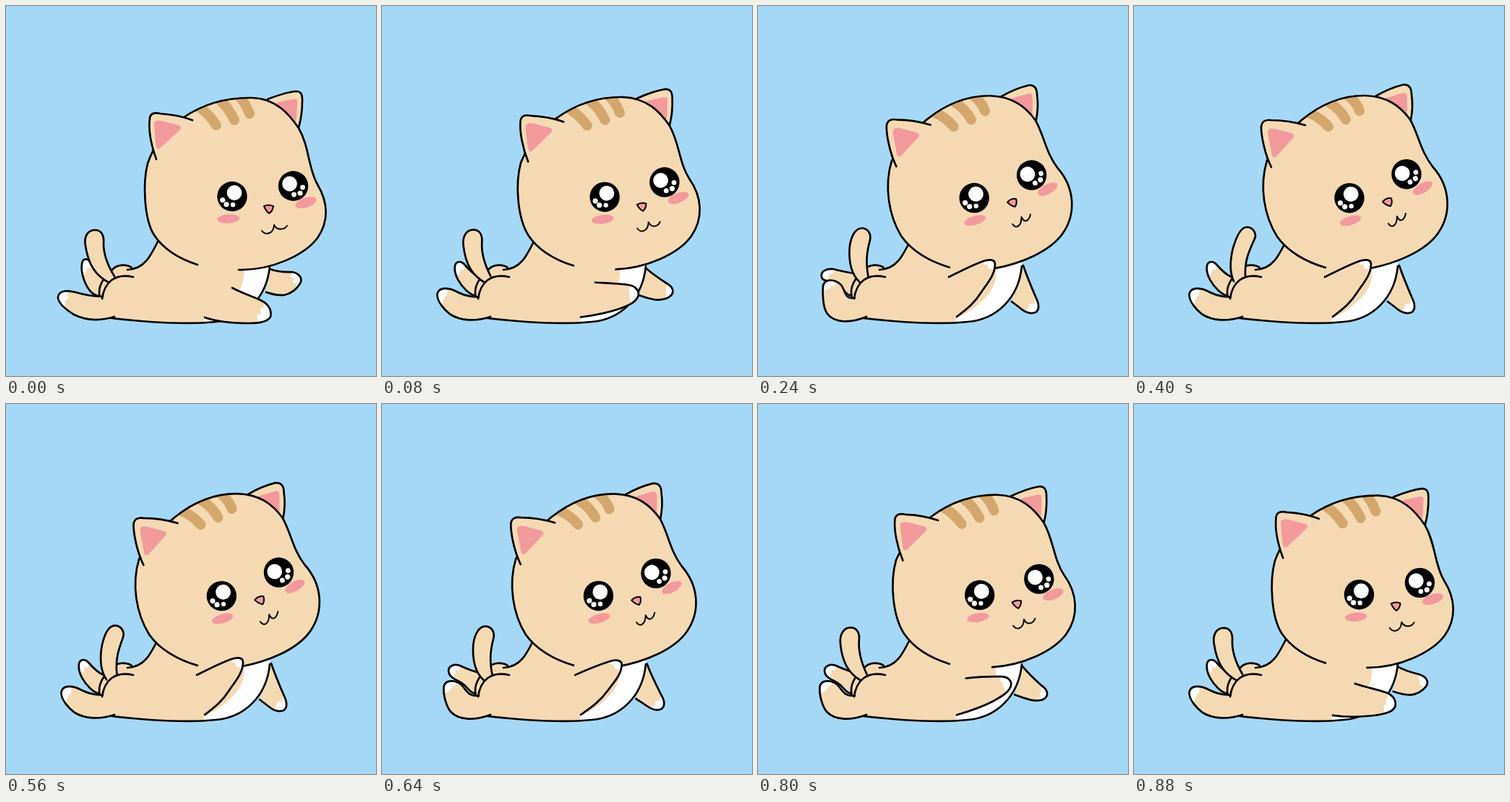
An HTML page with a canvas for the animation above (960 ms loop, 512x512 px).

```html
<!DOCTYPE html>
<html lang="en">
<head>
<meta charset="utf-8">
<title>Kitten</title>
<style>
html, body { margin: 0; width: 100%; height: 100%; overflow: hidden; background: #a5d8f7; }
canvas { display: block; width: 512px; height: 512px; }
</style>
</head>
<body>
<canvas id="stage" width="512" height="512"></canvas>
<script>
const ctx = document.getElementById('stage').getContext('2d');
const SKY = '#a5d8f7', FUR = '#f5d9b3', TAN = '#d3a66d', PINK = '#f2999c', INK = '#000', WHITE = '#fff';
const STEP = 80, COUNT = 12;

// Pose weights for each step of the loop
const headPose = [0, .32, .66, .92, 1, 1, 1, .98, .9, .74, .42, .1];
const armPose = [0, .5, 1, 2, 2, 2, 2, 2, 1.75, 1.3, .7, .2];
const tailPose = [0, .1, .33, .62, .88, 1, 1, .84, .6, .34, .15, .03];

const poses = {
  farArm: [
    'M365 364C378 369 388 368 396 368C406 370 411 377 407 384C402 392 394 398 385 400C374 401 366 398 360 396',
    'M366 362C372 374 382 388 391 399C398 406 399 413 393 417C387 420 378 416 372 413C364 409 358 407 353 405',
    'M367 359C372 374 378 388 384 402C389 412 390 420 384 424C376 427 369 423 364 419C359 415 355 412 351 409'],
  farPaw: [
    'M396 360L394 376L398 376L397 383L402 384L402 395L420 395L415 360',
    'M402 399L391 402L390 407L386 407L386 412L380 420L390 430L405 420',
    'M394 406L383 408L381 413L376 412L374 417L366 428L380 435L395 425'],
  nearArm: [
    'M313 390C328 398 342 402 354 408C364 413 368 422 366 430C362 438 348 439 335 439C310 439 290 436 275 431',
    'M277 375C295 369 315 366 328 364C338 362 345 366 343 373C341 383 330 391 322 399C308 412 292 421 275 430',
    'M264 375C280 367 296 359 309 354C318 350 328 350 328 357C328 372 317 384 309 396C299 412 288 420 275 430'],
  nearPaw: [
    'M358 405L356 419L352 418L353 426L347 427L350 445L375 445L375 405',
    'M326 360L327 370L332 369L333 376L338 376L340 385L355 385L350 355',
    'M311 349L313 358L317 357L319 364L323 363L325 372L340 372L330 345'],
  farLeg: [
    'M134 376C127 372 121 362 117 355C113 348 106 349 105 357C103 370 110 388 118 396C122 400 128 402 134 402',
    'M134 370C124 369 112 366 104 364C95 363 86 367 88 375C90 383 105 380 112 386C119 392 121 401 134 402'],
  farToe: [
    'M120 352L116 364L112 362L110 371L106 368L95 372L95 340',
    'M106 358L103 371L99 370L97 377L93 377L80 388L80 360'],
  nearLeg: [
    'M134 402C118 402 106 399 96 396C88 394 74 392 72 402C71 412 86 422 94 427C110 435 130 436 150 430',
    'M134 404C121 406 121 397 117 389C113 380 94 374 90 387C89 400 90 418 96 426C106 439 128 439 150 430'],
  nearToe: [
    'M88 390L84 400L87 403L82 408L81 418L60 418L60 390',
    'M110 374L106 388L102 386L98 392L90 394L80 390L90 370'],
  tail: [
    'M145 384C124 374 114 358 110 332C107 317 115 310 123 310C132 310 136 317 135 329C135 345 142 361 150 374',
    'M138 381C133 370 132 355 137 335C142 318 148 306 156 306C165 306 170 315 167 322C160 338 153 350 154 374'],
  head: [
    'M265 358C237 349 217 335 205 317C191 295 189 245 196 218C212 170 265 126 340 127C374 128 392 150 405 169C420 195 418 225 431 247C446 272 447 298 431 321C413 345 367 366 322 365',
    'M265 362C237 354 212 339 198 319C180 290 173 250 184 214C202 184 250 123 320 124C350 125 368 138 382 157C394 178 396 200 413 222C439 251 439 288 421 314C403 340 362 356 327 363'],
  stripes: [
    'M269 141Q281 150 291 165M296 130Q308 141 316 158M324 126Q332 136 337 149',
    'M242 148Q258 154 269 167M269 133Q285 142 293 157M296 124Q308 133 312 145'],
  leftEar: [
    'M208 212C200 190 197 170 199 155C200 148 206 147 214 149C230 150 245 153 258 158',
    'M190 223C181 205 176 180 176 167C177 159 182 157 190 158C206 158 220 160 237 165'],
  leftInner: [
    'M205 164C205 158 211 158 216 159L239 165C244 167 243 170 238 174L214 196C209 200 208 196 207 190',
    'M185 176C185 169 190 169 195 170L218 176C223 178 222 181 218 185L198 207C193 212 191 209 190 202'],
  rightEar: [
    'M362 129C375 124 390 119 401 118C408 118 410 122 410 130C410 145 408 158 405 168',
    'M334 125C346 118 360 112 372 109C380 108 384 113 384 122C386 135 385 148 383 158'],
  rightInner: [
    'M372 139C369 137 372 135 377 133L397 129C403 128 404 131 403 136L402 155C401 163 399 163 394 157',
    'M346 133C343 131 346 129 350 127L370 121C377 119 378 122 378 128L378 144C378 152 376 154 371 147'],
  nose: ['M357 277Q363 274 370 277Q369 284 364 287Q360 284 357 277',
         'M344 271Q349 265 356 266Q358 272 355 277Q349 276 344 271'],
  mouth: ['M354 311C358 317 370 317 371 303C375 311 385 310 389 304',
          'M352 301C356 308 364 305 364 291C368 300 374 297 376 287']
};

const lerp = (a, b, k) => a + (b - a) * k;

// Blend neighbouring poses of a path
function shape(name, k) {
  const list = poses[name];
  const i = Math.min(Math.floor(k), list.length - 2);
  const next = list[i + 1].match(/\d+/g);
  let n = 0;
  return new Path2D(list[i].replace(/\d+/g, v => lerp(+v, +next[n++], k - i).toFixed(2) + ' '));
}

function fill(path, color) {
  ctx.fillStyle = color;
  ctx.fill(path);
}

function line(path, width = 2.7, color = INK) {
  ctx.lineWidth = width;
  ctx.strokeStyle = color;
  ctx.stroke(path);
}

function clipped(path, draw) {
  ctx.save();
  ctx.clip(path);
  draw();
  ctx.restore();
}

function limb(name, tip, k) {
  const path = shape(name, k);
  fill(path, FUR);
  clipped(path, () => fill(shape(tip, k), WHITE));
  line(path);
}

function oval(x, y, rx, ry, color, angle = 0) {
  ctx.fillStyle = color;
  ctx.beginPath();
  ctx.ellipse(x, y, rx, ry, angle * Math.PI / 180, 0, 7);
  ctx.fill();
}

function eye(x, y, tilt, shines) {
  ctx.save();
  ctx.translate(x, y);
  oval(0, 0, 20.7, 20.7, INK);
  ctx.rotate(tilt);
  for (const [dx, dy, r] of shines) oval(dx, dy, r, r, WHITE);
  ctx.restore();
}

const leftShines = [[3, -5, 10.4], [-13.3, 5, 3.6], [-8, 11, 3.6], [1, 11.5, 3.2]];
const rightShines = [[-5, -3, 10.4], [13, 2, 3.4], [9.5, 10, 3.6], [1, 12, 3.4]];

const torso = new Path2D('M214 318C200 347 192 364 173 362C167 357 154 357 147 365C134 376 126 390 130 403L150 431C200 438 255 441 290 437C330 434 361 404 365 360L340 330Z');
const belly = new Path2D('M328 355C333 378 325 395 310 408C300 418 285 428 274 432L274 438.5Q282 438 290 437C330 434 361 404 365 355Z');
const underline = new Path2D('M146 432C200 438 255 441 290 437C330 434 361 404 365 360');
const back = new Path2D('M214 318C200 347 192 364 168 365M130 403C126 390 134 376 147 365C154 357 167 357 174 362');
const thigh = new Path2D('M133 405C136 383 150 369 176 375');
const haunch = new Path2D('M133 405C136 383 150 369 176 375L190 425L150 430Z');

function drawHead(k) {
  const rightEar = shape('rightEar', k), leftEar = shape('leftEar', k), head = shape('head', k);
  fill(rightEar, FUR);
  fill(shape('rightInner', k), PINK);
  line(rightEar);
  fill(head, FUR);
  clipped(head, () => line(shape('stripes', k), 14, TAN));
  line(head);
  fill(leftEar, FUR);
  fill(shape('leftInner', k), PINK);
  line(leftEar);

  oval(lerp(308, 299.5, k), lerp(294.5, 297, k), 15.3, 6.2, PINK, lerp(-3, -17, k));
  oval(lerp(415, 399.5, k), lerp(272, 252, k), 15, 6.8, PINK, lerp(-17, -30, k));
  eye(lerp(313, 298, k), lerp(263.5, 265.7, k), -.15 * k, leftShines);
  eye(lerp(397.5, 377, k), lerp(249, 232.7, k), -.35 * k, rightShines);
  const nose = shape('nose', k);
  fill(nose, PINK);
  line(nose, 2);
  line(shape('mouth', k), 2);
}

function render(step) {
  const kick = (1 - Math.cos(step * Math.PI / 3)) / 2;
  const arm = armPose[step];
  ctx.fillStyle = SKY;
  ctx.fillRect(0, 0, 512, 512);
  limb('farArm', 'farPaw', arm);
  limb('farLeg', 'farToe', kick);
  fill(torso, FUR);
  fill(belly, WHITE);
  line(underline);
  line(back);
  const tail = shape('tail', tailPose[step]);
  fill(tail, FUR);
  line(tail);
  fill(haunch, FUR);
  limb('nearLeg', 'nearToe', kick);
  line(thigh);
  drawHead(headPose[step]);
  limb('nearArm', 'nearPaw', arm);
}

ctx.lineCap = ctx.lineJoin = 'round';
const start = performance.now();
let shown = -1;
function tick() {
  const step = Math.floor((performance.now() - start) / STEP) % COUNT;
  if (step !== shown) render(shown = step);
  requestAnimationFrame(tick);
}
tick();
</script>
</body>
</html>
```
